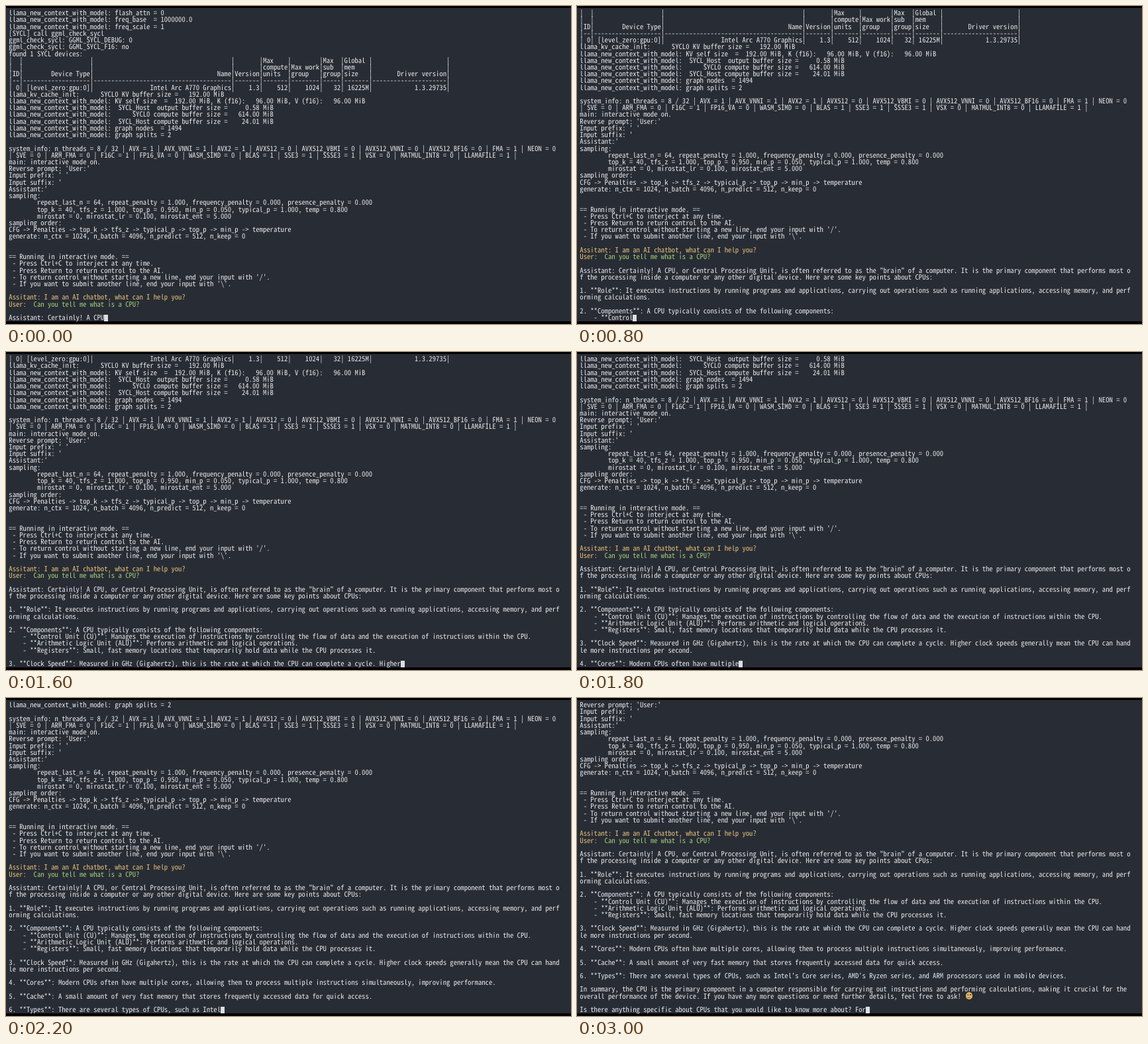
Write an HTML page that moves like this. It is 853x480 px and loops after 3.2 s.

```html
<!DOCTYPE html>
<html lang="en">
<head>
<meta charset="utf-8">
<title>Terminal chat</title>
<style>
  :root { --cell: 5.333px; --row: 10.222px; }
  html, body { margin: 0; width: 100%; height: 100%; overflow: hidden; background: #000; }
  #screen { position: absolute; left: 0; top: 3px; width: 853px; height: 473px; background: #282c34; }
  pre {
    position: absolute; left: 4.3px; top: 6.2px; margin: 0; color: #e6e9ee;
    font: 10.667px/var(--row) "Noto Sans Mono CJK SC", "Noto Sans Mono CJK JP", "DejaVu Sans Mono", monospace;
    font-size-adjust: ch-width 0.5;
    font-variant-ligatures: none; text-rendering: geometricPrecision;
  }
  .prompt { color: #e5c07b; }
  .input { color: #a3cf7c; }
  #cursor { position: absolute; top: 466px; width: var(--cell); height: 10.2px; background: #dcdfe4; }
  .smile { position: relative; }
  .smile::before, .smile::after { content: ""; position: absolute; }
  .smile::before {
    left: 1.5px; top: 1.5px; width: 10.5px; height: 10.5px; border-radius: 50%;
    background: radial-gradient(circle at 3.4px 4px, #6b4a2c 0.8px, transparent 1.2px),
                radial-gradient(circle at 7.1px 4px, #6b4a2c 0.8px, transparent 1.2px), #dfb568;
  }
  .smile::after {
    left: 4.3px; top: 6.5px; width: 5px; height: 2.5px;
    border-bottom: 1px solid #6b4a2c; border-radius: 0 0 50% 50%;
  }
</style>
</head>
<body>
<div id="screen"></div>
<div id="cursor"></div>
<pre id="text"></pre>
<script>
const COLS = 156, ROWS = 46, STEP = 200;
const widths = [2, 19, 39, 7, 7, 8, 5, 7, 21];
const row = cells => `|${cells.split(',').map((c, i) => c.padStart(widths[i])).join('|')}|`;
const rule = `|${widths.map(w => '-'.repeat(w)).join('|')}|`;
const ctx = 'llama_new_context_with_model: ';

const log = String.raw`${ctx}flash_attn = 0
${ctx}freq_base  = 1000000.0
${ctx}freq_scale = 1
[SYCL] call ggml_check_sycl
ggml_check_sycl: GGML_SYCL_DEBUG: 0
ggml_check_sycl: GGML_SYCL_F16: no
found 1 SYCL devices:
${row(',,,,Max    ,,Max  ,Global ,')}
${row(',,,,compute,Max work,sub  ,mem    ,')}
${row('ID,Device Type,Name,Version,units  ,group   ,group,size   ,Driver version')}
${rule}
${row('0,[level_zero:gpu:0],Intel Arc A770 Graphics,1.3,512,1024,32,16225M,1.3.29735')}
llama_kv_cache_init:      SYCL0 KV buffer size =   192.00 MiB
${ctx}KV self size  =  192.00 MiB, K (f16):   96.00 MiB, V (f16):   96.00 MiB
${ctx} SYCL_Host  output buffer size =     0.58 MiB
${ctx}     SYCL0 compute buffer size =   614.00 MiB
${ctx} SYCL_Host compute buffer size =    24.01 MiB
${ctx}graph nodes  = 1494
${ctx}graph splits = 2

system_info: n_threads = 8 / 32 | AVX = 1 | AVX_VNNI = 1 | AVX2 = 1 | AVX512 = 0 | AVX512_VBMI = 0 | AVX512_VNNI = 0 | AVX512_BF16 = 0 | FMA = 1 | NEON = 0
| SVE = 0 | ARM_FMA = 0 | F16C = 1 | FP16_VA = 0 | WASM_SIMD = 0 | BLAS = 1 | SSE3 = 1 | SSSE3 = 1 | VSX = 0 | MATMUL_INT8 = 0 | LLAMAFILE = 1 |
main: interactive mode on.
Reverse prompt: 'User:'
Input prefix: ' '
Input suffix: '
Assistant:'
sampling:
        repeat_last_n = 64, repeat_penalty = 1.000, frequency_penalty = 0.000, presence_penalty = 0.000
        top_k = 40, tfs_z = 1.000, top_p = 0.950, min_p = 0.050, typical_p = 1.000, temp = 0.800
        mirostat = 0, mirostat_lr = 0.100, mirostat_ent = 5.000
sampling order:
CFG -> Penalties -> top_k -> tfs_z -> typical_p -> top_p -> min_p -> temperature
generate: n_ctx = 1024, n_batch = 4096, n_predict = 512, n_keep = 0


== Running in interactive mode. ==
 - Press Ctrl+C to interject at any time.
 - Press Return to return control to the AI.
 - To return control without starting a new line, end your input with '/'.
 - If you want to submit another line, end your input with '\'.

Assitant: I am an AI chatbot, what can I help you?
User:  Can you tell me what is a CPU?

`;

// "~" marks where the reply has got to at the end of each step
const reply = `Assistant: Certainly! A CPU~, or Central Processing Unit, is often referred to as the "brain" of a computer. It is the primary component that~ performs most of the processing inside a computer or any other digital device. Here are some key points about CPUs~:

1. **Role**: It executes instructions by running programs and applications, carrying out operations such as running applications, accessing memory,~ and performing calculations.

2. **Components**: A CPU typically consists of the following components:
    - **Control~ Unit (CU)**: Manages the execution of instructions by controlling the flow of~ data and the execution of instructions within the CPU.
    - **Arithmetic Logic Unit (ALU)**: Performs arithmetic and logical operations.
    - **Registers~**: Small, fast memory locations that temporarily hold data while the CPU processes it~.

3. **Clock Speed**: Measured in GHz (Gigahertz), this is the rate at which the CPU can complete a cycle. Higher~ clock speeds generally mean the CPU can handle more instructions per second.

4. **Cores**: Modern CPUs often have multiple~ cores, allowing them to process multiple instructions simultaneously, improving performance.

5. **Cache**: A small amount of very fast~ memory that stores frequently accessed data for quick access.

6. **Types**: There are several types of CPUs, such as Intel~'s Core series, AMD's Ryzen series, and ARM processors used in mobile devices.

In summary, the CPU~ is the primary component in a computer responsible for carrying out instructions and performing calculations,~ making it crucial for the overall performance of the device. If you have any more questions or need further details, feel free to ask! 😊

Is there anything~ specific about CPUs that you would like to know more about? For`.split('~');

const wrap = line => line.match(new RegExp(`.{1,${COLS}}`, 'gu')) || [''];
const paint = line => line
  .replace(/^Assitant:.*/, '<span class="prompt">$&</span>')
  .replace(/^(User:)(.*)/, '<span class="prompt">$1</span><span class="input">$2</span>')
  .replace('😊', '<span class="smile"></span>');

const text = document.getElementById('text');
const cursor = document.getElementById('cursor');
let shown = -1;

function draw(step) {
  const typed = log + reply.slice(0, step + 1).join('');
  const lines = typed.split('\n').flatMap(wrap).slice(-ROWS);
  text.innerHTML = lines.map(paint).join('\n');
  cursor.style.left = `calc(4.3px + ${lines.at(-1).length} * var(--cell))`;
}

function tick() {
  const step = Math.floor(performance.now() / STEP) % reply.length;
  if (step !== shown) draw(shown = step);
  requestAnimationFrame(tick);
}
tick();
</script>
</body>
</html>
```
